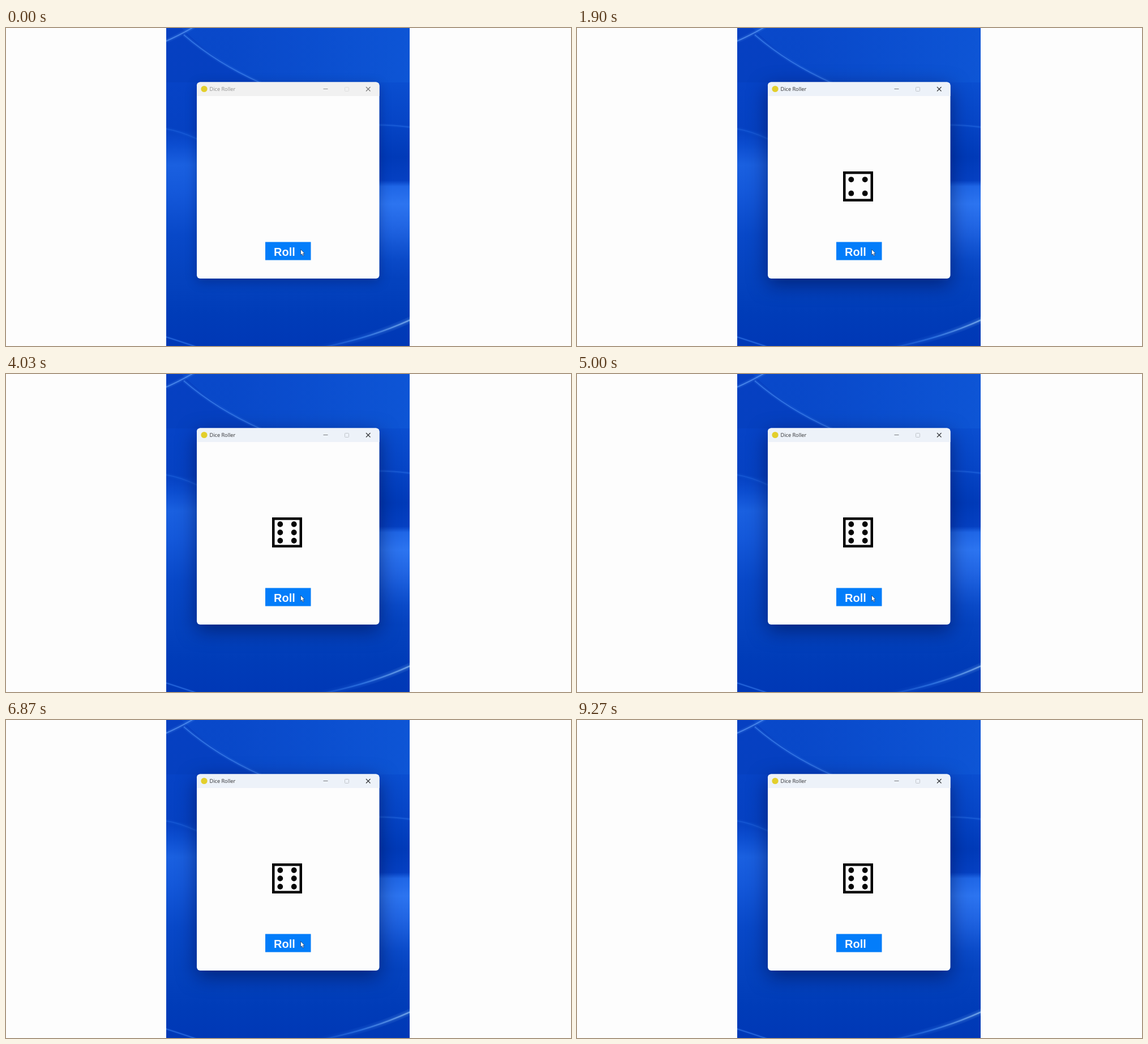
An HTML page with a canvas that plays this animation: 998 px wide and 561 px high, repeating every 9.63 s.

```html
<!DOCTYPE html>
<html lang="en">
<head>
<meta charset="utf-8">
<title>Dice Roller</title>
<style>
  html, body { margin: 0; width: 100%; height: 100%; overflow: hidden; background: #fdfdfd; }
  canvas { display: block; width: 100%; height: 100%; }
</style>
</head>
<body>
<canvas id="stage" width="998" height="561"></canvas>
<script>
const W = 998, H = 561, LOOP = 9630;
const ctx = document.getElementById('stage').getContext('2d');
const desk = { x: 283, y: 0, w: 430, h: H };
const win = { x: 337, y: 95.5, w: 322.5, h: 346.5, bar: 24.5 };
const FOCUS_AT = 230, CURSOR_OFF = 9170;
const rolls = [[1250, 4], [3200, 6], [5050, 1], [6850, 6]];
const wallpaper = makeWallpaper();

function gradient(g, x0, y0, x1, y1, stops) {
  const fill = g.createLinearGradient(x0, y0, x1, y1);
  for (const [at, color] of stops) fill.addColorStop(at, color);
  return fill;
}

// A soft light line: wide faint strokes beneath a narrow bright one.
function streak(g, pts, color, width, glow) {
  const [x0, y0, cx, cy, x1, y1] = pts;
  g.strokeStyle = color;
  for (const [scale, alpha] of [[glow, 0.1], [glow / 2, 0.15], [1, 0.6]]) {
    g.globalAlpha = alpha;
    g.lineWidth = width * scale;
    g.beginPath();
    g.moveTo(x0, y0);
    g.quadraticCurveTo(cx, cy, x1, y1);
    g.stroke();
  }
  g.globalAlpha = 1;
}

function makeWallpaper() {
  const c = document.createElement('canvas');
  c.width = W;
  c.height = H;
  const g = c.getContext('2d');
  g.fillStyle = '#fdfdfd';
  g.fillRect(0, 0, W, H);
  g.beginPath();
  g.rect(desk.x, desk.y, desk.w, desk.h);
  g.clip();

  g.fillStyle = gradient(g, 0, 0, 0, H, [
    [0, '#0640c2'], [0.17, '#0540c0'], [0.36, '#0440c2'],
    [0.8, '#0442be'], [0.9, '#003cb8'], [1, '#0038b6']
  ]);
  g.fillRect(desk.x, 0, desk.w, H);

  // Lighter sheet above the upper curve.
  g.fillStyle = gradient(g, 400, 0, 713, 0, [[0, 'rgba(16,92,220,.3)'], [1, 'rgba(16,92,220,.75)']]);
  g.beginPath();
  g.moveTo(310, 0);
  g.quadraticCurveTo(372, 62, 450, 97);
  g.lineTo(713, 150);
  g.lineTo(713, 0);
  g.fill();

  g.fillStyle = gradient(g, 0, 96, 0, 442, [
    [0, '#0643c6'], [0.24, '#0541c2'], [0.32, '#0c4dd0'], [0.42, '#1a60e0'],
    [0.56, '#1458da'], [0.78, '#0848c8'], [1, '#0442be']
  ]);
  g.fillRect(desk.x, 96, 215, 346);
  g.fillStyle = gradient(g, 0, 96, 0, 442, [
    [0, '#0a4ed0'], [0.2, '#0645c6'], [0.38, '#003ab8'], [0.5, '#0540c2'],
    [0.53, '#1f66e6'], [0.62, '#2c74f0'], [0.74, '#2064e2'], [0.9, '#0a4ac8'], [1, '#0442be']
  ]);
  g.fillRect(498, 96, 215, 346);

  streak(g, [283, 23, 306, 13, 332, -2], '#6aa8ff', 1.5, 5);
  streak(g, [314, 12, 372, 62, 450, 97], '#4d92f8', 1.3, 5);
  streak(g, [283, 178, 308, 182, 338, 196], '#2469e0', 1.2, 6);
  streak(g, [655, 171, 685, 171, 714, 175], '#2c70e4', 1.2, 5);
  streak(g, [283, 545, 305, 552, 335, 562], '#3d83f0', 1.2, 4);
  const shine = gradient(g, 540, 0, 713, 0, [
    [0, 'rgba(70,140,245,0)'], [0.5, '#3c86f2'], [1, '#a8d8ff']
  ]);
  streak(g, [550, 565, 642, 548, 716, 514], shine, 2.2, 5);
  return c;
}

function box(x, y, w, h, r) {
  ctx.beginPath();
  ctx.roundRect(x, y, w, h, r);
}

function line(color, width, ...pts) {
  ctx.strokeStyle = color;
  ctx.lineWidth = width;
  ctx.beginPath();
  for (let i = 0; i < pts.length; i += 4) {
    ctx.moveTo(pts[i], pts[i + 1]);
    ctx.lineTo(pts[i + 2], pts[i + 3]);
  }
  ctx.stroke();
}

function dot(x, y, r, color) {
  ctx.fillStyle = color;
  ctx.beginPath();
  ctx.arc(x, y, r, 0, Math.PI * 2);
  ctx.fill();
}

function label(text, x, y, font, color) {
  ctx.font = font;
  ctx.fillStyle = color;
  ctx.fillText(text, x, y);
}

function drawWindow(active) {
  ctx.save();
  ctx.beginPath();
  ctx.rect(desk.x, desk.y, desk.w, desk.h);
  ctx.clip();
  ctx.shadowColor = active ? 'rgba(0,10,60,.55)' : 'rgba(0,10,60,.32)';
  ctx.shadowBlur = active ? 34 : 20;
  ctx.shadowOffsetY = active ? 10 : 5;
  ctx.fillStyle = '#fdfdfd';
  box(win.x, win.y, win.w, win.h, 6);
  ctx.fill();
  ctx.restore();

  ctx.fillStyle = active ? '#edf2f9' : '#f1f1f1';
  box(win.x, win.y, win.w, win.bar, [6, 6, 0, 0]);
  ctx.fill();

  dot(350, 107.5, 5.6, '#e3cf2c');
  label('Dice Roller', 359.5, 111, '9.2px "Open Sans", "Noto Sans", sans-serif', active ? '#2c2d30' : '#8c8c8c');
  line(active ? '#77797c' : '#939393', 1, 560.5, 107.5, 568.5, 107.5);
  ctx.strokeStyle = active ? '#c0c4ca' : '#dedede';
  box(598.5, 104.5, 7, 7, 1);
  ctx.stroke();
  line(active ? '#333538' : '#777', 1.2, 636, 104, 643.5, 111.5, 643.5, 104, 636, 111.5);
}

function drawDie(n) {
  ctx.strokeStyle = '#000';
  ctx.lineWidth = 4.5;
  ctx.strokeRect(472.25, 255.25, 48.5, 48.5);
  const cx = 496.5, cy = 279.5, dx = 12.2;
  const dy = n === 6 ? 14.5 : 12.2;
  const pip = (x, y) => dot(cx + x, cy + y, 4.9, '#050505');
  if (n % 2) pip(0, 0);
  if (n > 3) for (const x of [-dx, dx]) {
    pip(x, -dy);
    pip(x, dy);
    if (n === 6) pip(x, 0);
  }
}

function drawButton() {
  ctx.fillStyle = '#037dfa';
  ctx.fillRect(458, 377.5, 80.5, 32);
  label('Roll', 473, 401.8, 'bold 20px "Liberation Sans", Arial, sans-serif', '#f5faff');
}

function drawCursor() {
  ctx.save();
  ctx.translate(520.5, 390.5);
  ctx.beginPath();
  ctx.moveTo(0, 0);
  for (const [x, y] of [[0, 10], [2.2, 8], [3.9, 11.6], [5.6, 10.8], [4, 7.3], [7, 7.2]]) ctx.lineTo(x, y);
  ctx.closePath();
  ctx.fillStyle = '#fff';
  ctx.fill();
  ctx.strokeStyle = '#1c3e6c';
  ctx.lineWidth = 0.8;
  ctx.stroke();
  ctx.restore();
}

function draw(t) {
  ctx.drawImage(wallpaper, 0, 0);
  drawWindow(t >= FOCUS_AT);
  const roll = rolls.filter(([at]) => t >= at).pop();
  if (roll) drawDie(roll[1]);
  drawButton();
  if (t < CURSOR_OFF) drawCursor();
}

const start = performance.now();
function tick() {
  draw((performance.now() - start) % LOOP);
  requestAnimationFrame(tick);
}
tick();
</script>
</body>
</html>
```
